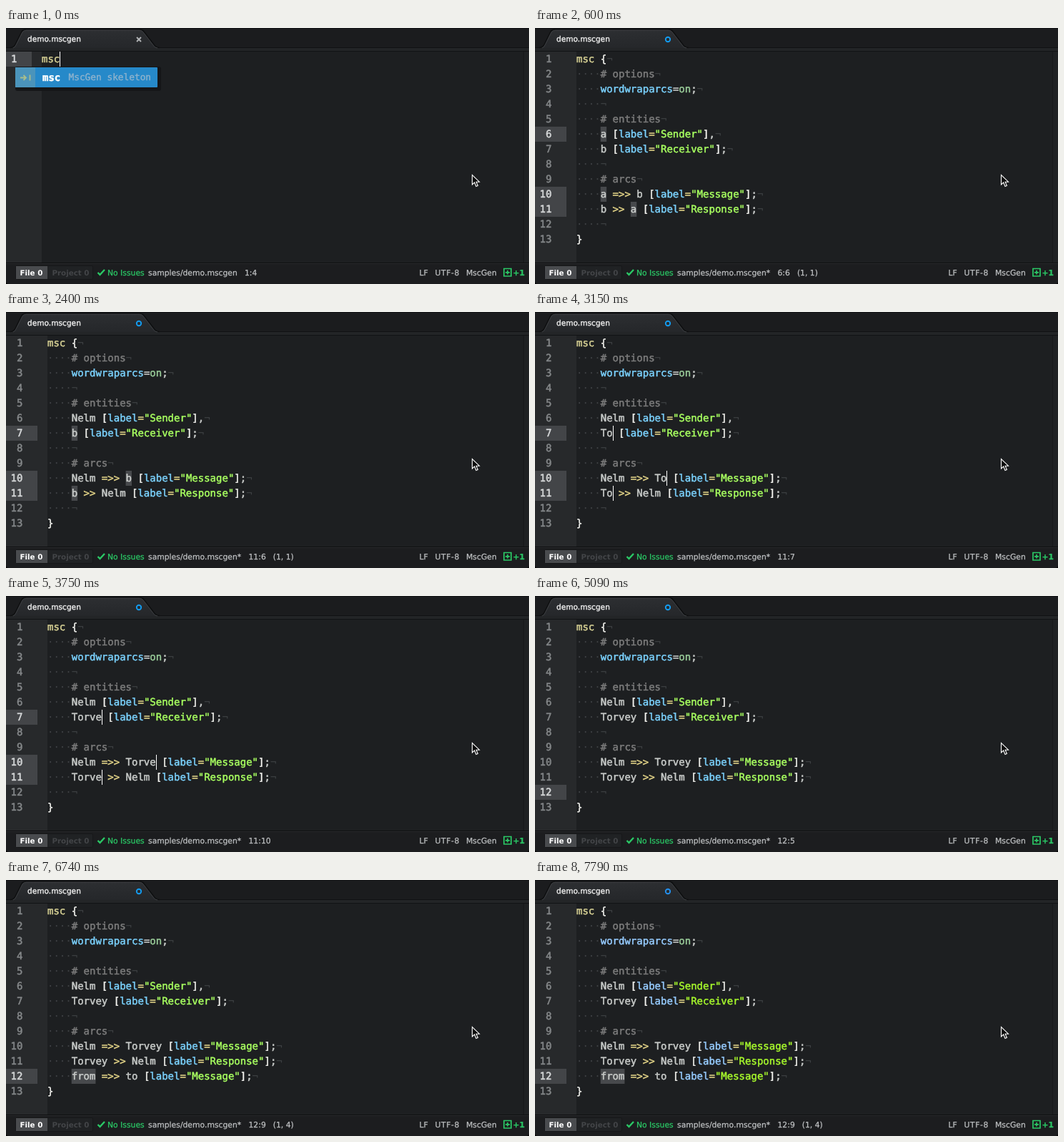
Recreate the animation shown at these times as an HTML page. Size 732 by 358 pixels, loop 8000 ms.

```html
<!DOCTYPE html>
<html lang="en">
<head>
<meta charset="utf-8">
<title>Editor demo</title>
<style>
html, body { margin: 0; width: 100%; height: 100%; overflow: hidden; background: #1d1f21; }
svg { display: block; width: 732px; height: 358px; }
text { white-space: pre; text-rendering: geometricPrecision; fill: currentColor; stroke: currentColor; }
.mono { font: 14px "DejaVu Sans Mono", monospace; stroke-width: .5px; }
.hint { font-size: 12.8px; stroke-width: .35px; }
.faint { stroke: none; }
.ui { font: 10.8px "DejaVu Sans", sans-serif; stroke-width: .25px; }
.bold { font-weight: bold; }
.small { font-size: 10.3px; stroke: none; }
.title { font-size: 10.6px; stroke-width: .45px; }
</style>
</head>
<body>
<svg viewBox="0 0 732 358">
  <defs>
    <linearGradient id="tab" x2="0" y2="1">
      <stop stop-color="#2d2f32"/><stop offset="1" stop-color="#25272a"/>
    </linearGradient>
  </defs>
  <rect width="732" height="358" fill="#1d1f21"/>
  <g id="editor"></g>
  <path d="M724.5 33V328" stroke="#17181a"/>
  <rect x="725" y="33" width="7" height="295" fill="#1f2123"/>

  <rect width="732" height="28" fill="#1b1c1e"/>
  <rect y="28" width="732" height="4" fill="#232527"/>
  <path d="M0 .5H732M0 27.5H732M0 32.5H732" stroke="#111214"/>
  <path d="M6 28Q11 27 13 23L22 5Q24 2 28 2H187Q191 2 193 5L207 23Q209 27 215 28Z" fill="url(#tab)"/>
  <g fill="none">
    <path d="M6 27.5Q11 27 13 23L22 5Q24 2 28 2H187Q191 2 193 5L207 23Q209 27 215 27.5" stroke="#0e0f10" stroke-width="1.500"/>
    <path d="M10 28Q13 27 14.500 23L23 6Q25 3.300 28 3.300H187Q190 3.300 192 6L205.500 23.500Q208 28 212 28" stroke="#3c3e41"/>
  </g>
  <text class="ui title" x="30" y="19" color="#e6e6e6">demo.mscgen</text>
  <g id="mark"></g>

  <rect y="328" width="732" height="30" fill="#1c1d1f"/>
  <path d="M0 328.5H732" stroke="#0f1011"/>
  <path d="M0 329.5H732" stroke="#28292c"/>
  <path d="M0 354Q0 358 4 358H0ZM732 354Q732 358 728 358H732Z" fill="#000"/>
  <rect x="13.5" y="332.5" width="108" height="19" rx="2" fill="#202224" stroke="#161719"/>
  <path d="M14 333H58V351H14Z" fill="#494b4e"/>
  <text class="ui bold small" x="19.500" y="346" color="#fff">File 0</text>
  <text class="ui bold small" x="64.5" y="346" color="#434548">Project 0</text>
  <path d="M128.5 342l3 3 6.500-7" fill="none" stroke="#2bc866" stroke-width="2.400"/>
  <g class="ui" color="#2bc866">
    <text x="142" y="346">No Issues</text>
    <text class="bold" x="709.5" y="346">+1</text>
  </g>
  <path d="M697 336.500H707V347H697ZM702 339V344.500M699 341.800H705" fill="none" stroke="#2bc866" stroke-width="1.700"/>
  <g class="ui" color="#bfc1c3">
    <text x="578.500" y="346">LF</text>
    <text x="600.500" y="346" letter-spacing=".6">UTF-8</text>
    <text x="644" y="346">MscGen</text>
    <g id="status"></g>
  </g>
  <g id="menu"></g>
  <path d="M652.500 205.500V219l3.200-3 2.300 5.500 2.400-1-2.300-5.300H662.500Z" fill="#0a0a0a" stroke="#fff" stroke-width="1.100"/>
</svg>
<script>
const LOOP = 8000, CH = 8.43, ROW = 21, TOP = 33;
const $ = id => document.getElementById(id);
const esc = s => s.replace(/&/g, "&amp;").replace(/</g, "&lt;").replace(/>/g, "&gt;");
const text = (x, y, s, color, cls = "mono") =>
  `<text class="${cls}" x="${x}" y="${y}" color="${color}">${esc(s)}</text>`;
const rect = (x, y, w, h, fill, rx = 0) =>
  `<rect x="${x}" y="${y}" width="${w}" height="${h}" fill="${fill}" rx="${rx}"/>`;

const arc = (typed, more) => ({ x: 55, y: 286, typed, shadow: !!more,
  items: [["arc", "MscGen arc"], ...(more || [])] });

// Each step changes part of the state at the given time.
const steps = [
  [0, { a: "a", b: "b", c: "", code: false, dirty: false, late: false, field: "", sel: false, caret: true, pos: "1:4", range: "",
        menu: { x: 13, y: 55, shadow: true, items: [["msc", "MscGen skeleton"]], typed: 3 } }],
  [150, { dirty: true }],
  [450, { caret: false }],
  [600, { code: true, menu: null, field: "a", sel: true, pos: "6:6", range: "(1, 1)" }],
  [1500, { a: "N", sel: false, caret: true, pos: "11:11", range: "" }],
  [1800, { a: "Nel", pos: "11:13" }],
  [2100, { a: "Nelm", pos: "11:14" }],
  [2400, { field: "b", sel: true, caret: false, pos: "11:6", range: "(1, 1)" }],
  [3000, { b: "T", sel: false, caret: true, range: "" }],
  [3150, { b: "To", pos: "11:7" }],
  [3300, { b: "Tor", pos: "11:8" }],
  [3600, { b: "Torv", pos: "11:9" }],
  [3750, { b: "Torve", pos: "11:10" }],
  [3900, { b: "Torvey", pos: "11:11" }],
  [4350, { caret: false }],
  [4640, { field: "c", caret: true, pos: "12:5" }],
  [5090, { caret: false }],
  [5540, { caret: true }],
  [5840, { c: "a", pos: "12:6" }],
  [5990, { menu: arc(1) }],
  [6140, { c: "ar", pos: "12:7", menu: arc(2) }],
  [6290, { c: "arc", pos: "12:8", menu: arc(3) }],
  [6440, { menu: arc(3, [["arcs", ""]]) }],
  [6740, { c: 'from =>> to [label="Message"];', menu: null, sel: true, caret: false, pos: "12:9", range: "(1, 4)" }],
  [7790, { late: true }]
];

const source = s => s.code ? [
  "msc {", "    # options", "    wordwraparcs=on;", "    ", "    # entities",
  `    ${s.a} [label="Sender"],`, `    ${s.b} [label="Receiver"];`, "    ", "    # arcs",
  `    ${s.a} =>> ${s.b} [label="Message"];`, `    ${s.b} >> ${s.a} [label="Response"];`,
  "    " + s.c, "}"
] : ["msc"];

// Line, column and length of every place the cursors stand on.
function spots(s) {
  const a = s.a.length, b = s.b.length;
  if (!s.code) return [[1, 0, 3]];
  if (s.field === "a") return [[6, 4, a], [10, 4, a], [11, 8 + b, a]];
  if (s.field === "b") return [[7, 4, b], [10, 9 + a, b], [11, 4, b]];
  return [[12, 4, s.sel ? 4 : s.c.length]];
}

function color(tok, next, late) {
  if (tok[0] === "#") return "#7c7c7c";
  if (tok[0] === '"') return late ? "#a6f72c" : "#a8ff60";
  if (tok === "label" || tok === "wordwraparcs") return late ? "#96cbfe" : "#7ad0fb";
  if (tok === "msc") return "#d6d094";
  if (/>>/.test(tok) || tok === "=" && next === '"') return "#e2d387";
  if (tok === "on") return "#99cc99";
  if (/[\[\]{}]/.test(tok)) return "#f4f4f0";
  return "#c9ccca";
}

function editor(s) {
  const left = s.code ? 58 : 50, at = col => left + col * CH;
  const marks = spots(s), active = new Set(marks.map(m => m[0]));
  let out = rect(0, TOP, left, 295, "#27292b");
  for (const n of active) out += rect(0, TOP + (n - 1) * ROW, left - 14, ROW, "#434548");
  if (s.sel) for (const [n, col, len] of marks)
    out += rect(at(col), TOP + (n - 1) * ROW, len * CH, ROW, "#47494c");
  const lines = source(s);
  lines.forEach((line, i) => {
    const y = TOP + 15 + i * ROW, num = String(i + 1);
    out += text(left - 34.6 - num.length * CH, y, num, active.has(i + 1) ? "#d8dadb" : "#85888a");
    if (line.startsWith("    ")) out += text(left, y, "····", "#404346", "mono faint");
    for (const m of line.matchAll(/#.*|"[^"]*"|\w+|=?>>|\S/g))
      out += text(at(m.index), y, m[0], color(m[0], line[m.index + 1], s.late));
    if (i < lines.length - 1) out += text(at(line.length), y, "¬", "#3e4144", "mono faint");
  });
  if (s.caret) for (const [n, col, len] of marks)
    out += rect(Math.round(at(col + len)), TOP + (n - 1) * ROW, 1, ROW, "#fff");
  return out;
}

function popup(m) {
  if (!m) return "";
  const { x, y, items, typed } = m, w = 199, h = 28;
  let out = m.shadow ? rect(x, y - 1, w + 5, items.length * h + 6, "#151618", 3) : "";
  items.forEach(([word, hint], i) => {
    const top = y + i * h, on = i === 0;
    out += rect(x, top, w, h, on ? "#2689c9" : "#25272a", 1);
    out += rect(x, top, 28, h, on ? "#4b94bb" : "#303235", 1);
    out += `<path d="M${x + 7} ${top + 14.500}h8m-3.500-3.500l3.500 3.500-3.500 3.500M${x + 20.500} ${top + 10.500}v8"
      fill="none" stroke="${on ? "#a9bd8c" : "#7c8468"}" stroke-width="1.800"/>`;
    out += text(x + 38, top + 19, word.slice(0, typed), on ? "#fff" : "#c9ccca", "mono bold");
    out += text(x + 38 + typed * CH, top + 19, word.slice(typed), on ? "#e4eff7" : "#a0a3a5");
    out += text(x + 190 - hint.length * 7.7, top + 18, hint, "#8fb3cd", "mono hint");
  });
  return out;
}

function status(s) {
  const x = s.dirty ? 339.500 : 334, ink = "#bfc1c3";
  const width = (s.pos.length - 1) * 6.87 + 3.64;
  return text(199, 346, "samples/demo.mscgen" + (s.dirty ? "*" : ""), ink, "ui") +
    text(x, 346, s.pos, ink, "ui") + text(x + width + 10, 346, s.range, ink, "ui");
}

const mark = s => s.dirty
  ? `<circle cx="186" cy="16" r="3.200" fill="none" stroke="${s.late ? "#2490ee" : "#139cf0"}" stroke-width="1.900"/>`
  : `<path d="M183 13l6 6m0-6l-6 6" stroke="#b2b4b6" stroke-width="1.900"/>`;

let shown = -1;
function draw(t) {
  const count = steps.filter(p => p[0] <= t).length;
  if (count === shown) return;
  shown = count;
  const s = Object.assign({}, ...steps.slice(0, count).map(p => p[1]));
  $("editor").innerHTML = editor(s);
  $("mark").innerHTML = mark(s);
  $("status").innerHTML = status(s);
  $("menu").innerHTML = popup(s.menu);
}

const start = performance.now();
function tick() {
  draw((performance.now() - start) % LOOP);
  requestAnimationFrame(tick);
}
tick();
</script>
</body>
</html>
```
